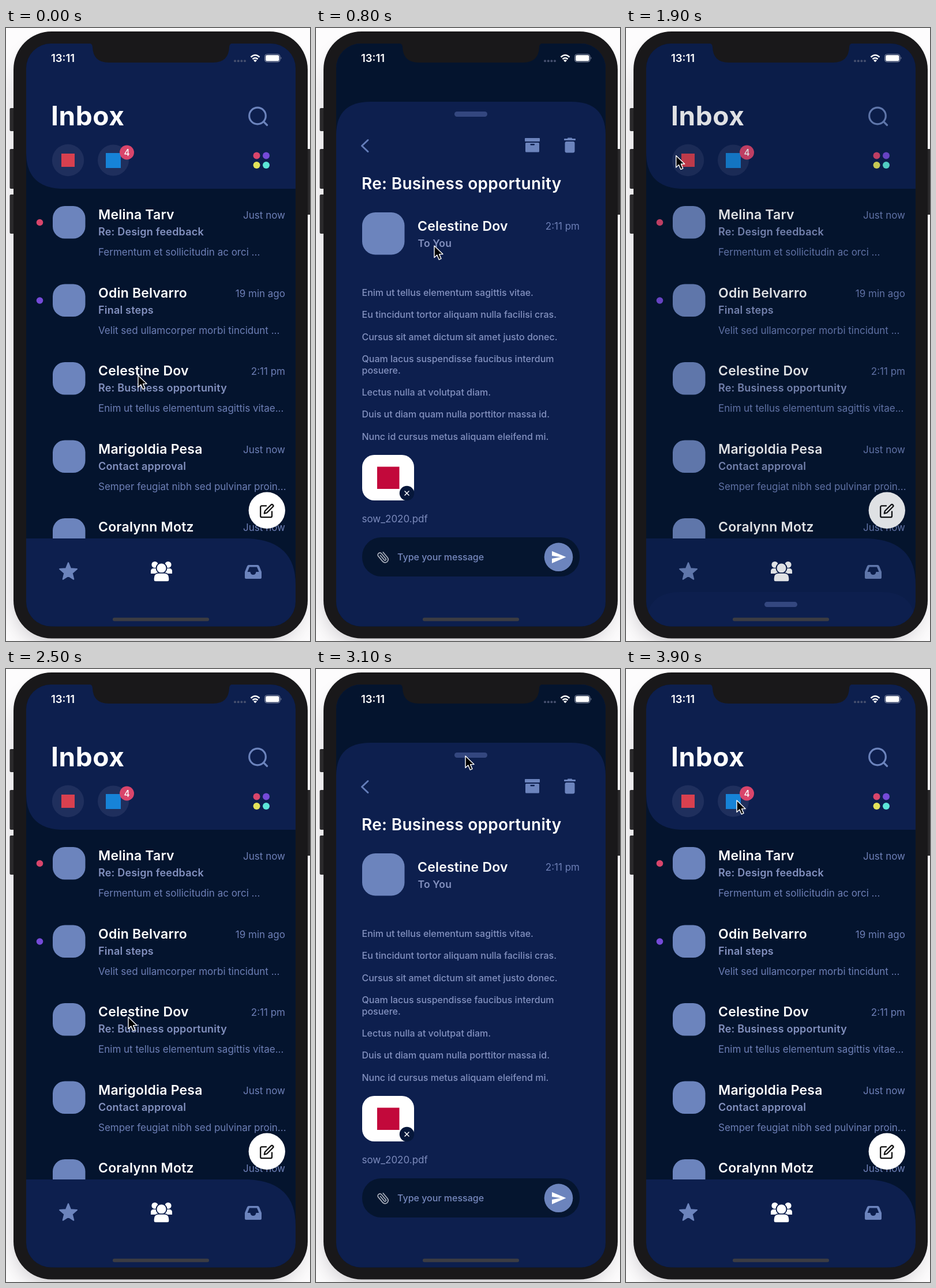
Animation of 527x1064 px, one loop 4 s. Source, as an HTML page:

```html
<!DOCTYPE html>
<html lang="en">
<head>
<meta charset="utf-8">
<title>Mail app</title>
<style>
  html, body { margin: 0; width: 100%; height: 100%; overflow: hidden; background: #fdfcfd; }
  svg { display: block; width: 100vw; height: 100vh; font-family: Inter, "Open Sans", sans-serif; }
  .name { font-size: 23px; font-weight: 600; letter-spacing: .2px; fill: #fff; }
  .subject { font-size: 18px; font-weight: 600; letter-spacing: .2px; fill: #8391bf; }
  .small { font-size: 17px; fill: #6d7fb6; }
  .body { font-size: 16px; font-weight: 500; fill: #8391bf; }
  .end { text-anchor: end; }
  .line { fill: none; stroke-linecap: round; stroke-linejoin: round; }
</style>
</head>
<body>
<svg id="stage" viewBox="0 0 527 1064"></svg>
<script>
const NAVY = '#0d1f4e', DARK = '#04142e', SOFT = '#6c84bd', CASE = '#19181a';
const RED = '#d9456b', PURPLE = '#754ad8';
const LOOP = 4000, TRAVEL = 910;

const rect = (x, y, w, h, r, fill, extra = '') =>
  `<rect x="${x}" y="${y}" width="${w}" height="${h}" rx="${r}" fill="${fill}" ${extra}/>`;
const circle = (x, y, r, fill, extra = '') =>
  `<circle cx="${x}" cy="${y}" r="${r}" fill="${fill}" ${extra}/>`;
const path = (d, fill, extra = '') => `<path d="${d}" fill="${fill}" ${extra}/>`;
const line = (d, color, width, extra = '') =>
  `<path class="line" d="${d}" stroke="${color}" stroke-width="${width}" ${extra}/>`;
const text = (x, y, cls, str, extra = '') =>
  `<text x="${x}" y="${y}" class="${cls}" ${extra}>${str}</text>`;

const mails = [
  ['Melina Tarv', 'Re: Design feedback', 'Fermentum et sollicitudin ac orci ...', 'Just now', RED],
  ['Odin Belvarro', 'Final steps', 'Velit sed ullamcorper morbi tincidunt ...', '19 min ago', PURPLE],
  ['Celestine Dov', 'Re: Business opportunity', 'Enim ut tellus elementum sagittis vitae...', '2:11 pm'],
  ['Marigoldia Pesa', 'Contact approval', 'Semper feugiat nibh sed pulvinar proin...', 'Just now'],
  ['Coralynn Motz', '', '', 'Just now']
];

const paragraphs = [
  [465, 'Enim ut tellus elementum sagittis vitae.'],
  [503, 'Eu tincidunt tortor aliquam nulla facilisi cras.'],
  [541.5, 'Cursus sit amet dictum sit amet justo donec.'],
  [580, 'Quam lacus suspendisse faucibus interdum'],
  [599.5, 'posuere.'],
  [637.5, 'Lectus nulla at volutpat diam.'],
  [676, 'Duis ut diam quam nulla porttitor massa id.'],
  [714.5, 'Nunc id cursus metus aliquam eleifend mi.']
];

function mailRow([name, subject, preview, time, dot], i) {
  return `<g transform="translate(0 ${i * 135.5})">
    ${dot ? circle(58.5, 337.5, 5.8, dot) : ''}
    ${rect(81, 309, 56.5, 56.5, 21, SOFT)}
    ${text(160, 332, 'name', name)}
    ${text(160, 360, 'subject', subject)}
    ${text(160, 395, 'small', preview)}
    ${text(484, 331, 'small end', time)}
  </g>`;
}

const header = () =>
  path('M35 27H502V279H95Q35 276 35 217Z', NAVY) +
  text(78, 169, '', 'Inbox', 'font-size="46" font-weight="700" letter-spacing=".6" fill="#fff"') +
  circle(436, 152.5, 14.3, 'none', `stroke="${SOFT}" stroke-width="3.2"`) +
  line('M446.5 162.5 452.5 168.5', SOFT, 3.2) +
  circle(107.5, 229.5, 27.7, '#1f2f5d') + rect(96, 218, 23, 23, 0, '#d8404f') +
  circle(186, 229.5, 27, '#1f2f5d') + rect(173, 217, 26, 26, 0, '#1683d8') +
  circle(209.5, 216, 12.5, RED) +
  text(209.5, 221.5, '', '4', 'font-size="15.5" font-weight="500" fill="#fff" text-anchor="middle"') +
  [[434.5, 221.5, RED], [451, 221.5, PURPLE], [434.5, 238, '#e2e25a'], [451, 238, '#5ce6d8']]
    .map(([x, y, c]) => circle(x, y, 6, c)).join('');

const composeButton = () =>
  circle(452.3, 837.3, 31.7, '#fff') +
  line('M11 4H4a2 2 0 0 0-2 2v14a2 2 0 0 0 2 2h14a2 2 0 0 0 2-2v-7' +
    'M18.5 2.5a2.12 2.12 0 0 1 3 3L12 15l-4 1 1-4Z', '#111', 2.1,
    'transform="translate(439 825) scale(1.1)"');

function star(cx, cy, outer, inner) {
  const points = Array.from({ length: 10 }, (_, i) => {
    const a = i * Math.PI / 5, r = i % 2 ? inner : outer;
    return `${(cx + r * Math.sin(a)).toFixed(1)} ${(cy - r * Math.cos(a)).toFixed(1)}`;
  });
  return path(`M${points.join('L')}Z`, SOFT, `stroke="${SOFT}" stroke-width="2" stroke-linejoin="round"`);
}

const navBar = () =>
  path('M35 886H420Q502 890 502 966V1040H35Z', NAVY) +
  star(108, 944, 15.8, 7) +
  [258, 281].map(x => circle(x, 931.5, 5.6, '#fff')).join('') +
  path('M251 947V943Q251 938 256 938H283Q288 938 288 943V947Z', '#fff') +
  circle(269.5, 937.5, 9, '#fff', `stroke="${NAVY}" stroke-width="2"`) +
  path('M256 961V955Q256 946 265 946H274Q283 946 283 955V958Q283 961 280 961H259Q256 961 256 958Z',
    '#fff', `stroke="${NAVY}" stroke-width="1.4"`) +
  path('M421 932H436Q438 932 439 934L443 944V954Q443 956 441 956H416Q414 956 414 954V944L418 934' +
    'Q419 932 421 932ZM422 935.5 418.5 944H423.500Q424 949 428.500 949T433.500 944H438.500L435 935.500Z',
    SOFT, 'fill-rule="evenodd"');

const sheet = () =>
  path('M35 1045V184Q36 128 94 128H443Q501 128 502 184V1045Z', NAVY) +
  rect(240, 145, 57, 9, 4.5, '#34477f') +
  line('M90 194.500 79.500 204.500 90 214.500', '#647db9', 3) +
  rect(362, 191, 26, 6, 1, SOFT) + rect(363, 199, 24, 16.500, 1.500, SOFT) + rect(371.500, 201, 7.500, 2.500, 1, NAVY) +
  rect(436, 190.500, 8, 3, 1, SOFT) + rect(430, 192, 20, 3, .8, SOFT) + rect(431.500, 197, 17, 19.500, 3, SOFT) +
  text(79, 279.500, '', 'Re: Business opportunity',
    'font-size="28" font-weight="600" letter-spacing=".3" fill="#fff"') +
  rect(80, 320, 73.500, 73.500, 23, SOFT) +
  text(176, 351.500, 'name', mails[2][0]) +
  text(176.500, 379.500, 'subject', 'To You', 'style="font-size:17.500px"') +
  text(457, 350, 'small end', mails[2][3]) +
  paragraphs.map(([y, str]) => text(79.500, y, 'body', str)).join('') +
  rect(80, 741, 90, 79, 21, '#fff') +
  rect(106, 761.500, 38.500, 38.500, 0, '#c2093b') +
  circle(157.500, 807.500, 12.700, '#06173a') +
  line('M154 804l7 7m0-7-7 7', '#fff', 1.500) +
  text(79.500, 857.500, 'small', 'sow_2020.pdf', 'style="fill:#7c8bbc"') +
  rect(80, 884, 377, 68, 33, '#05152f') +
  line('M21.400 11 12.200 20.200a6 6 0 0 1-8.500-8.500l9.200-9.200a4 4 0 0 1 5.700 5.700l-9.200 9.200a2 2 0 0 1-2.800-2.800l8.500-8.500',
    '#a7adba', 2, 'transform="translate(116.500 918.500) rotate(-85) scale(.9) translate(-12 -12)"') +
  text(141, 924, 'body', 'Type your message', 'style="fill:#7688bd"') +
  circle(420.500, 918.300, 24.800, SOFT) +
  path('M409 908 433.500 918.300 409 929V921L424 918.300 409 916Z', '#fff');

const statusBar = () =>
  text(78, 59, '', '13:11', 'font-size="18.500" font-weight="600" fill="#fff"') +
  [397, 402.700, 408.400, 414].map(x => circle(x, 57.300, 2, '#46506f')).join('') +
  line('M424.500 50.500Q432 43.500 439.500 50.500M427.500 54Q432 50 436.500 54', '#fff', 2.600, 'style="stroke-linecap:butt"') +
  path('M429 56.300Q432 53.800 435 56.300L432 59.300Z', '#fff') +
  rect(448.500, 45.500, 26.500, 13.500, 4, 'none', 'stroke="#8d95ad" stroke-width="1"') +
  rect(450, 47, 23.500, 10.500, 2.800, '#fff') +
  path('M476.500 50Q478.500 52.200 476.500 54.500Z', '#8d95ad');

const phoneCase = () =>
  rect(16, 40, 495, 1030, 70, '#77727a', 'opacity=".38" filter="url(#blur)"') +
  [[139, 40], [210, 69], [289, 68]].map(([y, h]) => rect(6.500, y, 10, h, 2, '#2a292b')).join('') +
  rect(518, 210, 12, 114, 2, '#2a292b') +
  rect(13, 6, 510, 1053.500, 66, CASE);

const stage = document.getElementById('stage');
stage.innerHTML = `
  <defs>
    <clipPath id="screen">${rect(35, 27, 467, 1011.500, 43, '#000')}</clipPath>
    <filter id="blur" x="-20%" y="-20%" width="140%" height="140%"><feGaussianBlur stdDeviation="18"/></filter>
  </defs>
  ${phoneCase()}
  <g clip-path="url(#screen)">
    ${rect(35, 27, 467, 1012, 0, DARK)}
    ${header()}${mails.map(mailRow).join('')}${composeButton()}${navBar()}
    ${rect(35, 27, 467, 1012, 0, DARK, 'id="shade"')}
    <g id="sheet">${sheet()}</g>
  </g>
  ${path('M143 26Q150 27 150 33Q151 60 178 60H359Q386 60 387 33Q387 27 394 26Z', CASE)}
  ${statusBar()}
  ${rect(185, 1023.500, 167, 6, 3, '#3c3c42')}
  <g id="cursor">${path('M0 0V20.500L4.800 16 8.200 24 12 22.400 8.600 14.600H15Z', '#000',
    'stroke="#fff" stroke-width="1.400" stroke-linejoin="round"')}</g>`;

const [shade, sheetNode, cursor] = ['shade', 'sheet', 'cursor'].map(id => document.getElementById(id));

// time, x, y of the pointer tip
const pointerKeys = [
  [0, 229, 603], [120, 213, 604], [350, 212, 604], [800, 205, 378], [1450, 83, 210],
  [1850, 83, 210], [2350, 212, 604], [2600, 212, 604], [3050, 259, 151], [3380, 259, 151],
  [3600, 257, 659], [3660, 256, 668], [3900, 192, 228]
];

const clamp = v => Math.min(1, Math.max(0, v));
const easeOut = v => 1 - (1 - v) ** 3;
const easeInOut = v => v < .5 ? 4 * v ** 3 : 1 - 4 * (1 - v) ** 3;
const smooth = v => v * v * (3 - 2 * v);

const opened = (t, start) => easeOut(clamp((t - start) / 480));
const closed = (t, start) => easeInOut(clamp((t - start) / 340));

// 0 = sheet fully open, 1 = sheet below the screen
function sheetPosition(t) {
  return 1 - opened(t, 250) + closed(t, 1647) - opened(t, 2560) + closed(t, 3473);
}

function pointerAt(t) {
  const next = pointerKeys.findIndex(key => key[0] > t);
  if (next < 0) return pointerKeys[pointerKeys.length - 1].slice(1);
  const [t0, x0, y0] = pointerKeys[next - 1], [t1, x1, y1] = pointerKeys[next];
  const k = smooth((t - t0) / (t1 - t0));
  return [x0 + (x1 - x0) * k, y0 + (y1 - y0) * k];
}

function render(t) {
  const p = clamp(sheetPosition(t));
  sheetNode.setAttribute('transform', `translate(0 ${(p * TRAVEL).toFixed(2)})`);
  shade.setAttribute('opacity', (1 - p * p).toFixed(3));
  cursor.setAttribute('transform', `translate(${pointerAt(t).map(v => v.toFixed(2)).join(' ')})`);
}

const start = performance.now();
function tick() {
  render((performance.now() - start) % LOOP);
  requestAnimationFrame(tick);
}
tick();
</script>
</body>
</html>
```
